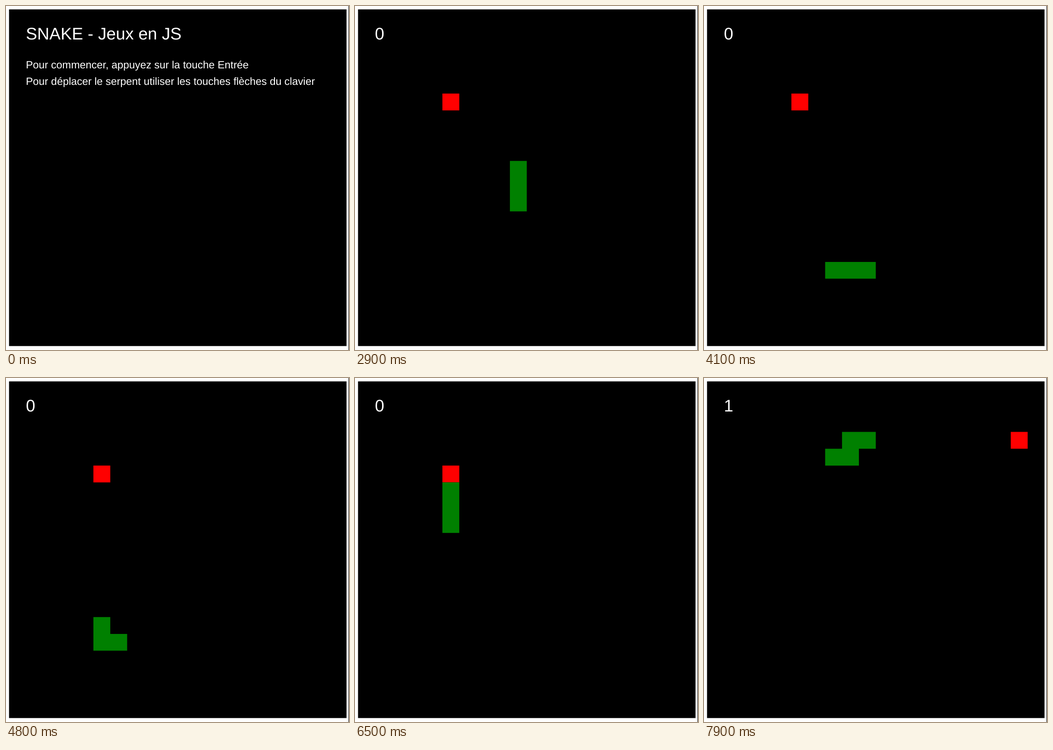
Recreate the animation shown at these times as an HTML page. Size 746 px wide and 750 px high, loop 8000 ms.

```html
<!DOCTYPE html>
<html lang="fr">
<head>
<meta charset="utf-8">
<title>Snake</title>
<style>
html, body { margin: 0; width: 100%; height: 100%; overflow: hidden; background: #fff; }
svg { display: block; width: 746px; height: 750px; }
text { font-family: "Liberation Sans", Arial, sans-serif; fill: #fff; text-rendering: geometricPrecision; }
.big { font-size: 36.7px; }
.small { font-size: 22.94px; }
</style>
</head>
<body>
<svg viewBox="0 0 746 750">
  <rect x="745" width="1" height="750" fill="#000"/>
  <rect x="6.6" y="7.4" width="734" height="734" fill="#000"/>
  <g id="intro">
    <text class="big" x="43.3" y="73">SNAKE - Jeux en JS</text>
    <text class="small" x="43.3" y="135.5">Pour commencer, appuyez sur la touche Entrée</text>
    <text class="small" x="43.3" y="172.2">Pour déplacer le serpent utiliser les touches flèches du clavier</text>
  </g>
  <g id="game">
    <text id="score" class="big" x="43.3" y="73">0</text>
    <rect id="food" width="36.7" height="36.7" fill="#f00"/>
    <polyline id="snake" fill="none" stroke="#008000" stroke-width="36.7" stroke-linecap="square"/>
  </g>
</svg>
<script>
const LOOP = 8000, CELL = 36.7, LEFT = 6.6, TOP = 7.4;
const START_LENGTH = 3, EAT_TICK = 19;
const FOODS = [[5, 5], [18, 3]];
// Times of the snake's steps, in tenths of a second
const TICKS = [26, 28, 30, 32, 35, 37, 39, 41, 43, 45, 48, 49, 51,
  54, 56, 58, 60, 62, 65, 66, 69, 70, 72, 74, 77, 79];
const DIRS = { D: [0, 1], L: [-1, 0], U: [0, -1], R: [1, 0] };

const el = id => document.getElementById(id);
const px = col => LEFT + col * CELL;
const py = row => TOP + row * CELL;

// Every cell the head passes through, from the first tail cell on
const trail = [[9, 8]];
for (const [dir, count] of [["D", 7], ["L", 4], ["U", 11], ["R", 3], ["U", 1], ["R", 1]]) {
  for (let i = 0; i < count; i++) {
    const [x, y] = trail[trail.length - 1];
    trail.push([x + DIRS[dir][0], y + DIRS[dir][1]]);
  }
}

function render(t) {
  const tick = TICKS.filter(s => s * 100 <= t).length - 1;
  const playing = tick >= 0;
  el("intro").style.display = playing ? "none" : "";
  el("game").style.display = playing ? "" : "none";
  if (!playing) return;

  const score = tick >= EAT_TICK ? 1 : 0;
  const head = tick + START_LENGTH;
  const body = trail.slice(head - START_LENGTH - score, head);
  const [fx, fy] = FOODS[score];
  el("score").textContent = score;
  el("food").setAttribute("x", px(fx));
  el("food").setAttribute("y", py(fy));
  el("snake").setAttribute("points",
    body.map(([x, y]) => `${px(x + 0.5)},${py(y + 0.5)}`).join(" "));
}

const start = performance.now();
function frame() {
  render((performance.now() - start) % LOOP);
  requestAnimationFrame(frame);
}
frame();
</script>
</body>
</html>
```
